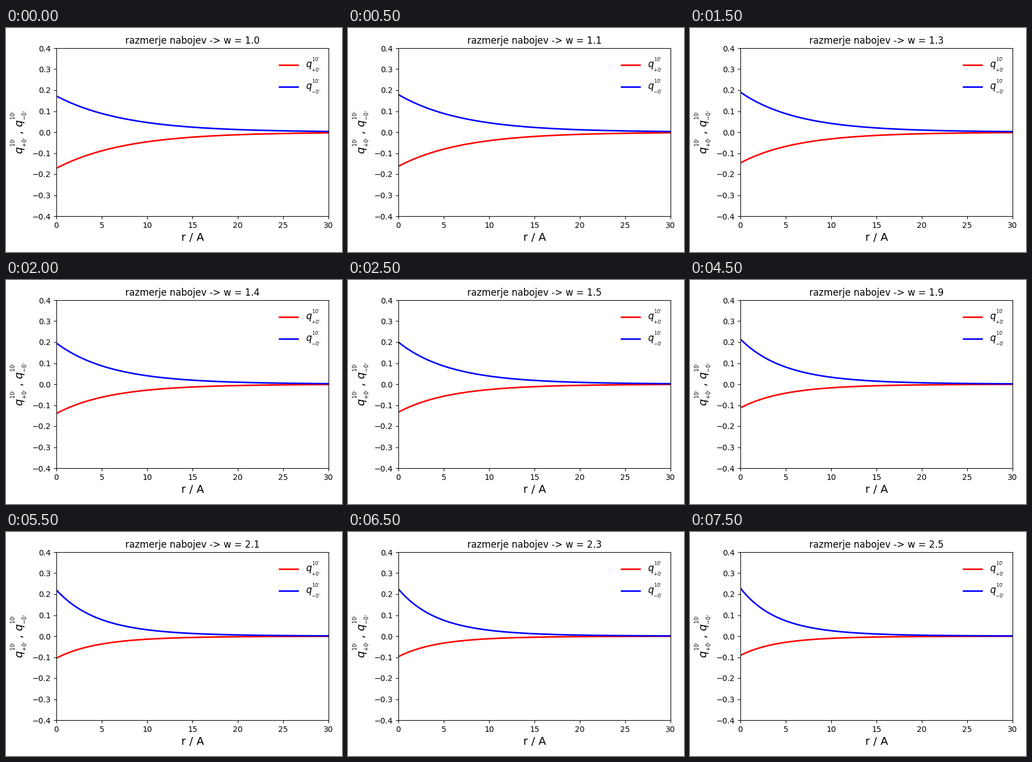
Write a matplotlib script that moves like this. It is 600 px wide and 400 px high and loops after 8000 ms.

```python
import numpy as np
import matplotlib.pyplot as plt
from matplotlib.animation import FuncAnimation

FRAMES, STEP = 16, 500
Q_PLUS = r"$q_{_{+0'}}^{^{10'}}$"
Q_MINUS = r"$q_{_{-0'}}^{^{10'}}$"

r = np.linspace(0, 30, 301)


def charges(w):
    """Both charge profiles for charge ratio w."""
    total = 0.344 * w ** -0.078
    decay = np.exp(-0.132 * r * w ** (0.655 - 0.011 * r))
    plus = -total / (1 + w) * decay
    return plus, -w * plus


fig, ax = plt.subplots(figsize=(6, 4), dpi=100)
fig.subplots_adjust(left=0.15, right=0.96, bottom=0.16, top=0.91)
ax.set_xlim(0, 30)
ax.set_ylim(-0.4, 0.4)
ax.set_xlabel("r / A", fontsize=14)
ax.set_ylabel(Q_PLUS + " , " + Q_MINUS, fontsize=14)

red, = ax.plot([], [], color="red", lw=2, label=Q_PLUS)
blue, = ax.plot([], [], color="blue", lw=2, label=Q_MINUS)
title = ax.set_title("", fontsize=12)
ax.legend(loc="upper right", fontsize=12, frameon=False)


def update(i):
    w = 1 + 0.1 * i
    plus, minus = charges(w)
    red.set_data(r, plus)
    blue.set_data(r, minus)
    title.set_text(f"razmerje nabojev -> w = {w:.1f}")
    return red, blue, title


anim = FuncAnimation(fig, update, frames=FRAMES, interval=STEP,
                     repeat=True, repeat_delay=0)
plt.show()
```
